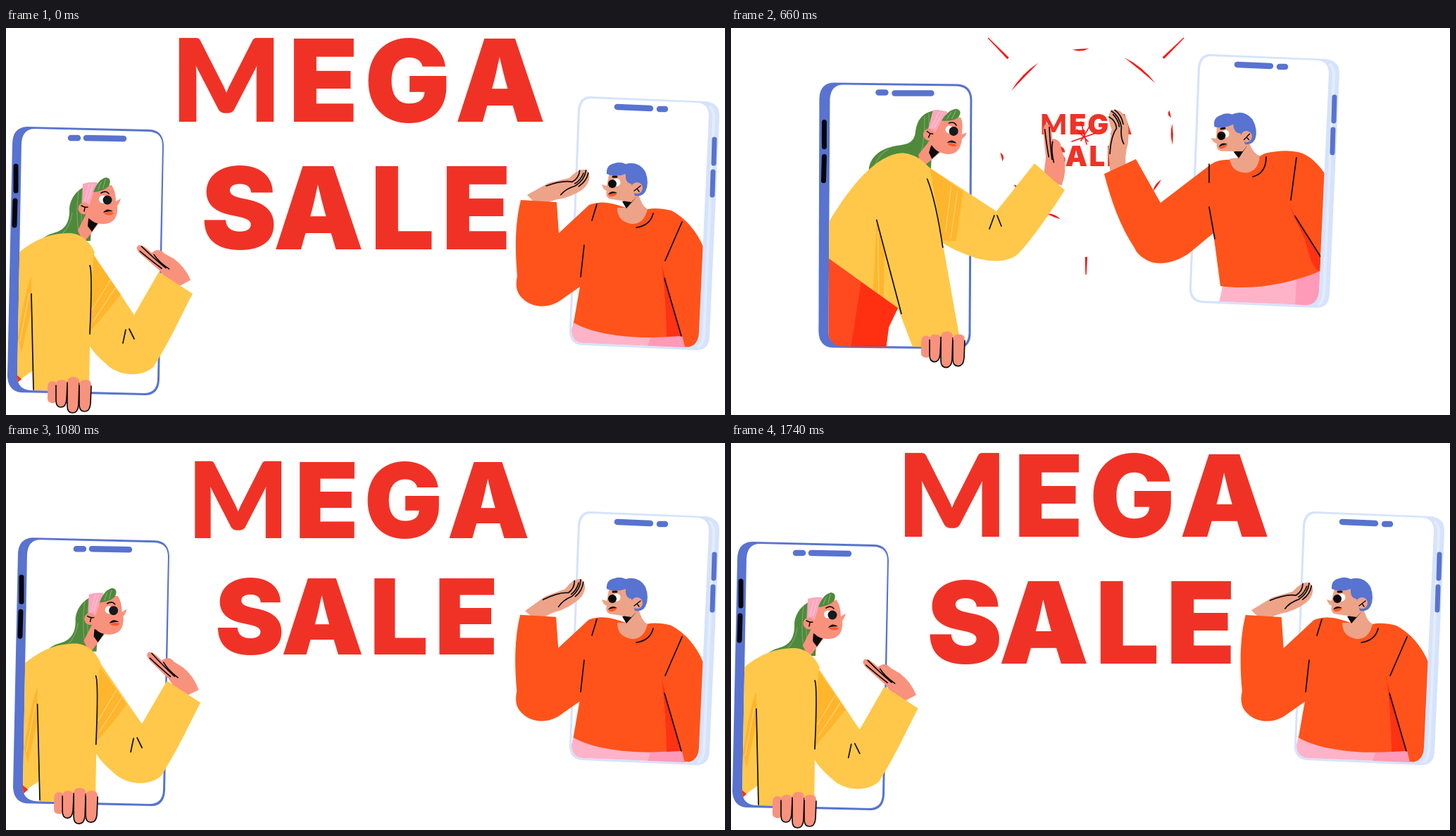
Animation, 1021 px wide and 549 px high, one loop 1770 ms. Source, as an HTML page with a canvas:

```html
<!DOCTYPE html>
<html lang="en">
<head>
<meta charset="utf-8">
<title>Mega sale</title>
<style>
  html, body { margin: 0; width: 100%; height: 100%; overflow: hidden; background: #fff; }
  canvas { display: block; }
</style>
</head>
<body>
<canvas id="stage" width="1021" height="549"></canvas>
<script>
const ctx = document.getElementById('stage').getContext('2d');
const LOOP = 1770;
const BLUE = '#5873d0', YELLOW = '#ffc84a', AMBER = '#ffb52c', GREEN = '#4f8a3c', PINK = '#ffa6be';
const ORANGE = '#ff531b', RED = '#ff3213', PALE = '#d5e3fc', SALE_RED = '#f03226';
const ROSE = '#f9927d', PEACH = '#eda388', INK = '#0c0c0c';

const clamp = x => Math.max(0, Math.min(1, x));
const ease = x => (1 - Math.cos(Math.PI * clamp(x))) / 2;
const lerp = (a, b, k) => a + (b - a) * k;

// Blends two path strings that share the same commands.
function mix(a, b, k) {
  const ends = b.match(/-?[\d.]+/g);
  let i = 0;
  return new Path2D(a.replace(/-?[\d.]+/g, v => lerp(+v, +ends[i++], k).toFixed(2)));
}
const asPath = p => typeof p === 'string' ? new Path2D(p) : p;
function fill(path, color) {
  ctx.fillStyle = color;
  ctx.fill(asPath(path));
}
function line(path, color = INK, width = 1.7) {
  ctx.strokeStyle = color;
  ctx.lineWidth = width;
  ctx.stroke(asPath(path));
}
function dot(x, y, r, color) {
  ctx.fillStyle = color;
  ctx.beginPath();
  ctx.arc(x, y, r, 0, 7);
  ctx.fill();
}
function group(x, y, draw, degrees = 0, pivotX = 0, pivotY = 0) {
  ctx.save();
  ctx.translate(x + pivotX, y + pivotY);
  ctx.rotate(degrees * Math.PI / 180);
  ctx.translate(-pivotX, -pivotY);
  draw();
  ctx.restore();
}

// Timing: both lean in, clap at about 600 ms, and lean back at different speeds.
const swing = (t, start, end, back) => 1.04 * ease((t - start) / (end - start)) * (1 - ease((t - 600) / (back - 600)));
const waveAt = t => t < 1230 ? ease((t - 960) / 270) : 1 - (t - 1230) / 600;

function drawBurst(t) {
  const u = (t - 585) / 150;
  if (u <= 0 || u >= 1) return;
  const r = 165 * (1 - (1 - u) ** 2), width = 4 * (1 - u);
  const arcs = [[-149, -123], [-99, -88], [-64, -37], [-17, -12], [-8, 6], [30, 40], [107, 117], [141, 146], [163, 169]];
  const rad = Math.PI / 180;
  group(504, 153, () => {
    ctx.fillStyle = '#f11';
    for (const [from, to] of arcs) {
      // A crescent: the inner edge is pulled in slightly mid-way.
      ctx.beginPath();
      ctx.arc(0, 0, r, from * rad, to * rad);
      const mid = (from + to) / 2 * rad, bend = r / Math.cos((to - from) / 2 * rad) - width * 3;
      ctx.quadraticCurveTo(bend * Math.cos(mid), bend * Math.sin(mid), r * Math.cos(from * rad), r * Math.sin(from * rad));
      ctx.fill();
    }
    for (let a = 0; a < 360; a += 45) {
      const inner = r + (a % 90 ? 32 : 48);
      group(0, 0, () => fill(`M${inner} -${width} L${r + 73} -0.7 L${r + 73} 0.7 L${inner} ${width * 0.6}Z`, '#f11'), a);
    }
    line('M-20 8 L14 -4 M-7 -20 L1 12 M-13 -9 L3 8 M5 -13 L-7 7', '#f11', width * 0.8);
  });
}

function drawText(t) {
  if (t >= 30 && t < 630) return;
  let scale = 1;
  if (t >= 630) scale = 0.907 * (1 - (1 - clamp((t - 630) / 300)) ** 3);
  if (t > 960) scale = lerp(0.907, 0.922, clamp((t - 960) / 270));
  if (t > 1230) scale = lerp(0.922, 1, (t - 1230) / 540);
  const glow = 55 + (t - 1230) * 0.9;
  const paint = ctx.createLinearGradient(0, glow - 85, 0, glow + 85);
  [[0, SALE_RED], [0.3, '#fb9038'], [0.7, '#fb8a36'], [1, SALE_RED]].forEach(s => paint.addColorStop(...s));
  ctx.save();
  ctx.translate(505.5, 157);
  ctx.scale(scale, scale);
  ctx.translate(-505.5, -157);
  ctx.textAlign = 'center';
  ctx.fillStyle = paint;
  const row = (word, centers, y) => [...word].forEach((c, i) => {
    // Lato's M has the short middle that the lettering needs.
    ctx.font = c === 'M' ? '900 164px Lato, sans-serif' : '900 162px Inter, sans-serif';
    ctx.fillText(c, centers[i], y);
  });
  row('MEGA', [313, 451, 570, 702], 133);
  row('SALE', [331, 444, 563, 668], 314);
  ctx.restore();
}

function womanHead() {
  fill('M143 248 L160 264 L138 292 L130 274Z', ROSE);
  fill('M145 257 L159 263 L150 276 L144 268Z', INK);
  fill('M155 212 L178 210 Q184 219 184 233 L191 229 Q189 236 186 239 Q188 263 168 265 Q150 266 143 252 L145 225Z', ROSE);
  fill('M137 208 Q146 205 158 206 L152 221 L146 240 L136 236Z', PINK);
  line('M146 209 L140 233 M151 209 L144 232', '#ffc0cf', 1.5);
  dot(139, 243, 8.5, ROSE);
  line('M135 239 Q140 242 144 241 M140 242 L139 247', INK, 1.5);
  fill('M152 220 Q158 202 170 199 Q178 200 175 209 Q172 217 152 220Z', GREEN);
  line('M163 206 L159 216 M169 202 L166 214', '#8bb579', 1);
  line('M163 221 Q170 217 174 222');
  dot(165.5, 230, 5.5, '#fff');
  dot(172, 231, 6.5, '#151a1d');
  fill('M167 250 Q173 247 181 249 Q179 254 170 252Z', '#ff5a2a');
  fill('M166 249 Q171 241 180 247 Q173 247 166 249Z', INK);
}

function womanHand() {
  fill('M-8 6 L-8 -27 Q-12 -45 -16 -64 Q-17 -74 -11 -74 Q-5 -73 -2 -54 Q11 -55 12 -42 L18 -29 Q24 -10 19 10Z', ROSE);
  line('M-14 -66 Q-9 -45 -4 -28 M-8 -70 Q-4 -45 1 -25 M-1 -50 Q-2 -38 4 -21');
}

function grip() {
  fill('M59 508 Q60 501 66 501 Q72 501 73 508 L72 528 Q70 533 65 532 Q59 531 59 526Z', ROSE);
  for (const [x, top, bottom, w] of [[71, 499, 538, 16], [87, 495, 546, 17], [104, 499, 544, 17]]) {
    const h = w / 2;
    const curve = `V${bottom - 10} Q${x} ${bottom} ${x + h - 1} ${bottom} Q${x + w - 2} ${bottom} ${x + w - 1} ${bottom - 11}`;
    fill(`M${x} ${top + 8} ${curve} L${x + w} ${top + 7} Q${x + w} ${top} ${x + h} ${top} Q${x} ${top} ${x} ${top + 8}Z`, ROSE);
    line(`M${x} ${top + 8} ${curve} L${x + w} ${top + 9}`);
  }
}

function drawWoman(t) {
  const wave = waveAt(t), lean = swing(t, 70, 622, 1117), arm = lean + 0.025 * wave;
  const shift = swing(t, 70, 622, 1175), drift = shift - lean;
  const lift = 25 * shift * (1 - shift);
  const m = (a, b) => mix(a, b, lean), ma = (a, b) => mix(a, b, arm);
  group(drift * 116, drift * -62 - lift, () => {
    fill(m('M30 140 Q9 141 9 165 L2 494 Q3 515 21 517 L199 521 Q217 520 218 499 L224 166 Q223 145 204 144Z',
      'M146 78 Q125 78 124 100 L123 432 Q124 453 143 454 L318 456 Q338 455 339 436 L341 102 Q340 81 320 80Z'), BLUE);
    fill(m('M41 143 L203 147 Q222 148 222 167 L215 499 Q214 518 196 518 L36 514 Q16 513 16 494 L22 164 Q23 143 41 143Z',
      'M158 81 L319 83 Q338 84 338 103 L336 434 Q335 453 317 453 L158 451 Q137 450 137 432 L139 102 Q140 81 158 81Z'), '#fff');
    line(m('M14 196 L14 231 M13 245 L12 280', 'M131 134 L131 169 M131 183 L130 217'), '#05060c', 7);
    line(m('M92 156 L102 156 M114 156 L167 157', 'M208 92 L218 92 M231 93 L283 93'), BLUE, 8.5);

    ctx.save();
    ctx.clip(m('M23 0 L22 164 L16 494 Q16 513 36 514 L1000 538 L1000 0Z',
      'M139 0 L139 102 L137 432 Q137 451 158 452 L1000 459 L1000 0Z'));
    fill(m('M128 221 C108 222 92 236 90 256 C91 275 84 286 70 290 C60 293 54 296 49 302 L120 302 L122 262 Q118 240 128 223Z',
      'M294 117 C268 119 262 133 260 150 C257 166 245 166 232 168 C210 172 195 184 194 203 L282 205 L284 165 Q280 140 292 118Z'), GREEN);
    line(m('M103 232 Q99 262 103 290 M109 227 Q105 262 109 295 M94 262 Q92 280 80 292',
      'M273 127 Q274 160 266 186 M279 122 Q282 160 273 190 M222 172 Q207 182 203 195'), '#76a564', 1.2);
    group(-28 + 170 * lean, 13 - 93 * lean, womanHead, 12 * lean, 191, 231);

    const angle = -45.5 + 43.2 * lean + 7 * wave;
    group(lerp(241, 450, arm), lerp(361, 212, arm), womanHand, angle + 8.6);
    fill(ma('M117 310 L182 407 L217 346 L265 377 C250 405 235 440 210 480 C195 495 165 495 146 480 C135 470 125 462 117 448Z',
      'M276 196 L375 261 L429 193 L472 231 C452 262 430 295 410 317 C395 335 370 333 348 328 C330 322 312 315 299 306Z'), YELLOW);
    fill(m('M124 323 L163 378 L142 404 L120 430Z', 'M281 200 L328 233 L318 303 L299 302Z'), AMBER);
    line(m('M148 358 L122 400 M155 369 L124 416', 'M311 224 L303 290 M320 232 L310 300'), '#ffcf69', 1.4);
    line(ma('M170 428 L166 447 M175 427 L182 441', 'M372 267 L365 286 M376 267 L382 282'));

    fill(m('M10 325 C40 300 60 291 92 291 C108 293 118 302 126 318 L121 336 L118 514 L39 514 L38 486 L10 506Z',
      'M125 297 C160 235 200 180 242 178 C262 180 272 190 281 200 L300 312 L325 453 L256 453 L235 398 L125 320Z'), YELLOW);
    fill(m('M36 352 L36 400 L22 460 L17 440 Q25 380 36 352Z', 'M205 275 L216 320 L215 383 L200 373 Q203 320 205 275Z'), AMBER);
    line(m('M33 376 L20 444', 'M207 290 L208 378'), '#ffcf69', 1.5);
    fill(m('M10 488 L22 498 L10 508 L4 512 L4 508Z', 'M125 319 L235 398 L222 425 L218 456 L125 456Z'), '#ff4a20');
    fill(m('M16 493 L22 498 L10 508 L4 512 L4 508Z', 'M183 361 L235 398 L222 425 L218 456 L168 456Z'), '#ff3011');
    line(m('M36 377 L39 513', 'M205 273 L240 406'));
    line(m('M119 337 Q123 345 119 434', 'M277 215 Q289 245 299 312'));
    ctx.restore();
    group(209 * lean, -64 * lean, grip);
  });
}

function manPhone() {
  fill('M829 97 L993 104 Q1014 106 1013 126 L999 438 Q998 457 980 457 L818 450 Q799 448 800 428 L812 116 Q814 97 829 97Z', PALE);
  line('M1000 112 Q1006 118 1005 130 L991 436 Q990 448 984 452', '#e3ecfd', 4);
  fill('M830 100 L983 106 Q998 108 998 125 L984 432 Q983 452 966 453 L820 447 Q803 446 803 428 L815 118 Q817 100 830 100Z', '#fff');
  line('M868 112 L915 114 M928 115 L936 115', BLUE, 8.5);
  line('M1006 158 L1005 192 M1004 204 L1003 237', BLUE, 7);
}

function manHead() {
  fill('M878 250 L898 234 Q902 252 911 257 Q906 278 889 278 Q868 275 868 255 L880 255Z', PEACH);
  fill('M875 246 L895 240 L881 256Z', INK);
  fill('M857 204 L853 224 L846 222 Q848 229 853 231 Q850 242 861 243 L888 247 L900 235 L892 205Z', PEACH);
  fill('M853 207 Q852 194 864 192 Q872 189 880 193 Q898 188 908 204 Q914 220 908 232 Q903 240 893 238 L888 221 Q879 220 880 207 Q866 212 853 207Z', BLUE);
  dot(896, 227, 8, PEACH);
  line('M892 231 L901 224 M896 228 L899 232', INK, 1.5);
  line('M862 211 L867 211', INK, 3);
  dot(867, 219, 5.5, '#fff');
  dot(861, 221, 6, INK);
  fill('M855 236 Q862 232 868 235 Q864 240 857 239Z', '#ff5a2a');
  fill('M855 236 Q860 229 868 234 Q861 234 855 236Z', INK);
}

function manHand() {
  fill('M-15 10 L-15 -25 Q-12 -36 -7 -54 Q-13 -74 -5 -81 Q8 -84 15 -68 Q19 -55 14 -32 Q7 -15 8 4Z', PEACH);
  line('M-9 -72 Q0 -66 0 -55 Q-9 -45 -13 -20 M-5 -80 Q6 -72 7 -56 Q4 -42 8 -32 M-3 -75 Q4 -66 4 -57 M0 -81 Q9 -73 10 -60');
}

function drawMan(t) {
  const wave = waveAt(t), lean = swing(t, 80, 583, 1080), arm = lean + 0.025 * wave;
  const m = (a, b) => mix(a, b, lean);
  const dx = -149 * lean, dy = -60 * lean;
  group(dx, dy, manPhone);
  ctx.save();
  ctx.translate(dx, dy);
  ctx.clip(new Path2D('M0 0 L998 0 L998 125 L984 432 Q983 452 966 453 L820 447 Q803 446 803 428 L0 428Z'));
  ctx.translate(-dx, -dy);

  group(lerp(756, 553, arm), lerp(245, 197, arm), manHand, 61 - 66.6 * lean - 16 * wave);
  fill(m('M806 415 L800 442 L815 455 L966 455 L962 433Z', 'M699 362 L693 390 L700 400 L840 400 L840 340Z'), '#ffb3c9');
  fill(m('M916 436 L910 455 L966 455 L962 433Z', 'M803 355 L801 400 L840 400 L840 340Z'), '#ff9ab8');
  fill(mix('M868 251 Q845 244 828 251 L785 291 L782 247 L731 244 C722 280 723 320 726 352 Q722 370 730 380 C745 398 768 398 785 388 L815 367 L806 418 C840 438 910 443 960 436 L964 452 L974 454 Q988 448 988 425 L991 312 Q975 275 945 259 Q925 254 911 257 Q900 262 868 251Z',
    'M710 187 Q693 186 682 193 L610 248 L575 186 L530 207 C540 245 552 280 573 312 Q577 322 590 329 C610 340 635 330 650 320 L685 291 L695 366 C735 372 790 365 836 345 L850 345 L860 345 Q865 330 865 320 L862 240 Q835 182 805 176 Q785 172 758 178 Q740 190 710 187Z',
    lean + 0.01 * wave), ORANGE);
  fill(m('M931 335 L959 437 L938 438 Q937 380 931 335Z', 'M792 251 L838 325 L836 344 L826 347 Q815 300 792 251Z'), RED);
  line(m('M839 250 L832 273 M821 308 L816 353', 'M679 193 L679 219 M679 254 L687 299'));
  line(m('M960 275 L936 330 M935 355 L959 437', 'M803 184 L795 244 M801 267 L837 324'));
  line(m('M895 283 Q915 280 919 263', 'M741 211 Q760 206 760 183'));
  group(-164 * lean, -66 * lean, manHead, -8 * lean, 846, 224);
  ctx.restore();
}

function render(now) {
  const t = Math.floor(now % LOOP / 30) * 30;
  ctx.fillStyle = '#fff';
  ctx.fillRect(0, 0, 1021, 549);
  ctx.lineCap = ctx.lineJoin = 'round';
  drawText(t);
  drawBurst(t);
  drawWoman(t);
  drawMan(t);
}

const start = performance.now();
function tick() {
  render(performance.now() - start);
  requestAnimationFrame(tick);
}
tick();
</script>
</body>
</html>
```
